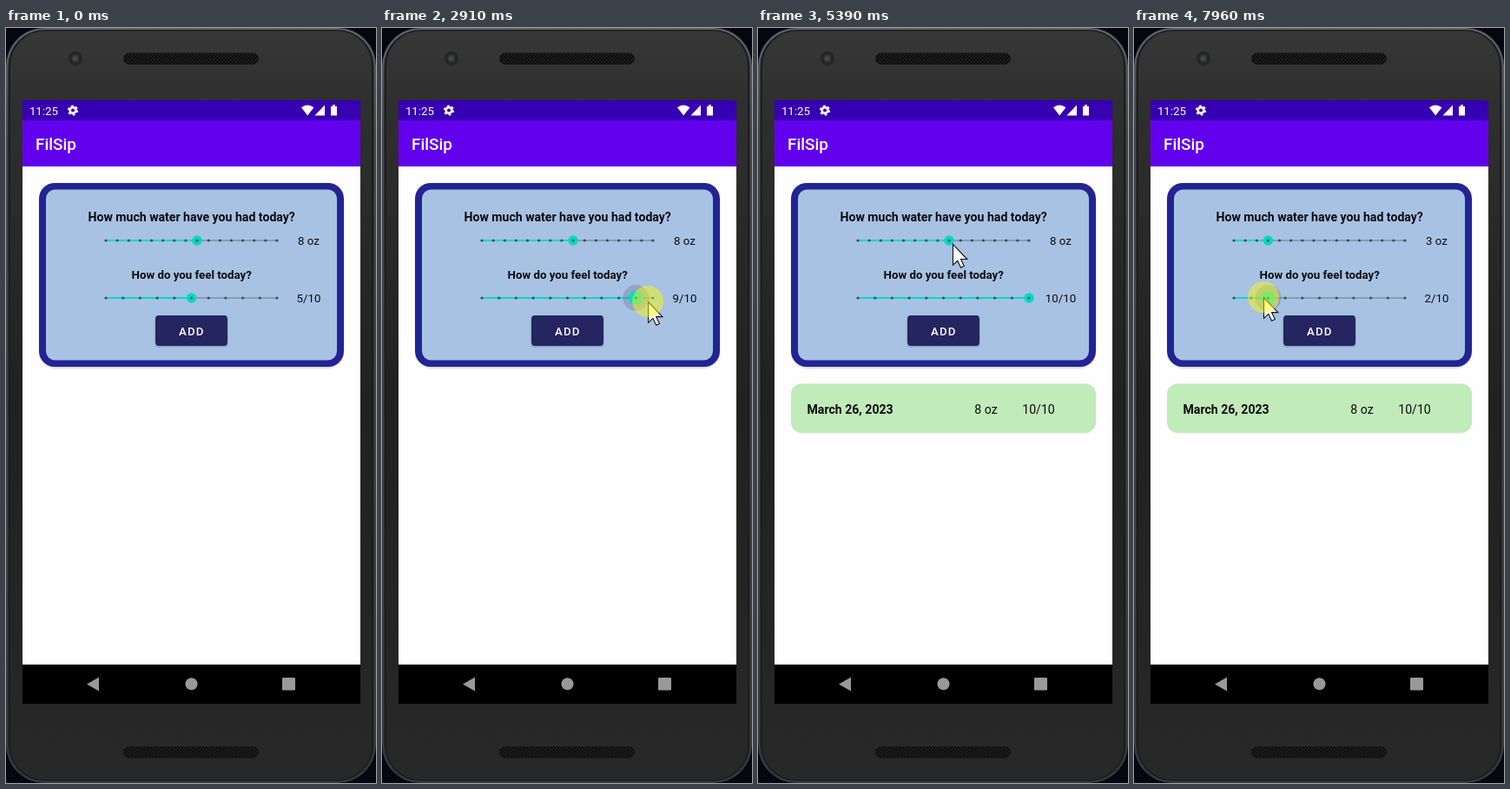
An HTML page that plays this animation: 426 px wide and 867 px high, repeating every 8000 ms.

```html
<!DOCTYPE html>
<html lang="en">
<head>
<meta charset="utf-8">
<title>Water log demo</title>
<style>
  html, body { margin: 0; width: 100%; height: 100%; overflow: hidden; background: #05060f; }
  svg { display: block; width: 100%; height: 100%; }
  text { font: 14.1px Roboto, sans-serif; fill: #0b0b0d; }
  .mid { text-anchor: middle; }
  .bold { font-weight: 700; }
  .small { font-size: 13.25px; }
  .bar { fill: #fff; font-size: 13.25px; }
  .title { fill: #fff; font-size: 18.9px; font-weight: 500; }
  .button { fill: #fff; font-size: 13.25px; font-weight: 500; letter-spacing: 1.18px; }
</style>
</head>
<body>
<svg viewBox="0 0 426 867">
  <defs>
    <linearGradient id="body" x2="0" y2="1">
      <stop offset="0" stop-color="#363736"/>
      <stop offset=".1" stop-color="#2e2f2e"/>
      <stop offset=".5" stop-color="#202120"/>
      <stop offset="1" stop-color="#272827"/>
    </linearGradient>
    <linearGradient id="rim" x2="0" y2="1">
      <stop offset="0" stop-color="#606166"/>
      <stop offset=".15" stop-color="#45464a"/>
      <stop offset="1" stop-color="#38393c"/>
    </linearGradient>
    <pattern id="mesh" width="4" height="4" patternUnits="userSpaceOnUse">
      <rect width="4" height="4" fill="#1c1c1c"/>
      <circle cx="1" cy="1" r=".9" fill="#060606"/>
      <circle cx="3" cy="3" r=".9" fill="#060606"/>
    </pattern>
    <clipPath id="buttonClip"><rect x="172" y="330" width="83" height="35" rx="4"/></clipPath>
    <filter id="soft" x="-10%" y="-20%" width="120%" height="150%"><feGaussianBlur stdDeviation="1.3"/></filter>
  </defs>

  <!-- Phone -->
  <rect width="426" height="867" fill="#05060f"/>
  <rect width="426" height="867" rx="44" fill="url(#rim)"/>
  <rect x="2.5" y="2" width="421" height="863" rx="42" fill="#1d1e1f"/>
  <rect x="5" y="3.5" width="416" height="860" rx="40" fill="url(#body)"/>
  <circle cx="80" cy="35" r="8" fill="#242525"/>
  <circle cx="80" cy="35" r="4.5" fill="#353940"/>
  <circle cx="79.5" cy="35" r="2" fill="#4a4f57"/>
  <g fill="url(#mesh)" stroke="#161616">
    <rect x="135.5" y="29" width="155" height="12.5" rx="6.2"/>
    <rect x="135.5" y="825.5" width="155" height="12.5" rx="6.2"/>
  </g>

  <!-- Screen -->
  <rect x="19" y="83" width="389" height="693" fill="#fefefe"/>
  <rect x="19" y="83" width="389" height="24" fill="#3700b3"/>
  <rect x="19" y="106" width="389" height="53" fill="#6200ee"/>
  <rect x="19" y="731" width="389" height="45"/>
  <text class="bar" x="26.9" y="99.5">11:25</text>
  <circle cx="77" cy="94.5" r="3.4" fill="none" stroke="#fff" stroke-width="2.6"/>
  <circle cx="77" cy="94.5" r="5.2" fill="none" stroke="#fff" stroke-width="1.8" stroke-dasharray="2.7 2.745"/>
  <path fill="#fff" d="M340 91.3Q347 85.5 354.5 91.3L347.2 100.5ZM367 88.5V100.5H355.5ZM374 90H376V88.3H379V90H381V100.5H374Z"/>
  <text class="title" x="34" y="139.5">FilSip</text>
  <g fill="#999">
    <path d="M93 753.5L107 745.5V761.5Z"/>
    <circle cx="213.5" cy="753.3" r="7"/>
    <rect x="318" y="746" width="15" height="14.5" rx="1.2"/>
  </g>

  <!-- Entry form -->
  <rect x="39" y="180" width="349" height="210.5" rx="18" fill="#777" opacity=".4" filter="url(#soft)"/>
  <rect x="38" y="178" width="351" height="211" rx="18" fill="#222493"/>
  <rect x="46" y="185.5" width="335" height="196" rx="10.5" fill="#a8c2e3"/>
  <text class="mid bold" x="213.7" y="221.5">How much water have you had today?</text>
  <text class="mid bold small" x="213.7" y="287.7">How do you feel today?</text>
  <g id="water"></g>
  <g id="feel"></g>
  <rect x="172" y="332" width="83" height="34" rx="4" fill="#334" opacity=".35" filter="url(#soft)"/>
  <rect x="172" y="330" width="83" height="35" rx="4" fill="#242561"/>
  <circle id="ripple" cx="230" cy="339" fill="#fff" clip-path="url(#buttonClip)"/>
  <text class="button" x="199" y="353">ADD</text>

  <!-- Saved entry -->
  <g id="entry">
    <rect x="39" y="411" width="349" height="54" rx="12" fill="#999" opacity=".4" filter="url(#soft)"/>
    <rect x="38" y="408.5" width="351" height="56" rx="12" fill="#c1ebb9"/>
    <text class="bold" x="56.5" y="442.5">March 26, 2023</text>
    <text class="mid" x="262.5" y="442.5">8 oz</text>
    <text class="mid" x="323" y="442.5">10/10</text>
  </g>

  <g id="pointer">
    <path d="M.5.5V24.3L5.8 19.3L9.6 27.3L13.3 25.6L9.6 17.6H16.8Z" fill="#fff" stroke="#111" stroke-width="1.1"/>
    <circle id="press" r="18" fill="#fafa08" opacity=".48"/>
  </g>
</svg>
<script>
const LOOP = 8000, LAG = 70, LEFT = 115, WIDTH = 197;
const $ = id => document.getElementById(id);
const clamp = v => Math.max(0, Math.min(1, v));
const progress = (t, from, to) => clamp((t - from) / (to - from));

// Pointer stops: time, x, y, and 1 where the move to the stop is eased.
const stops = [
  [540, 405, 862], [1310, 275, 454], [1660, 249, 372], [1940, 230, 322], [2140, 218, 312],
  [2280, 218, 309], [2910, 306, 314], [2980, 315, 314], [3120, 324, 314],
  [3320, 324, 314], [3870, 231, 338, 1], [4550, 231, 338], [5190, 224, 249, 1],
  [5390, 224, 248], [5460, 222, 243], [6080, 156, 246], [6150, 154, 246], [6290, 151, 246],
  [6550, 151, 246], [7260, 312, 307, 1], [7400, 312, 307], [7880, 158, 308], [7960, 149, 309]
];

function pointerAt(t) {
  const next = stops.findIndex(s => s[0] > t);
  if (next < 1) return next ? stops.at(-1).slice(1, 3) : stops[0].slice(1, 3);
  const [t0, x0, y0] = stops[next - 1], [t1, x1, y1, eased] = stops[next];
  let k = progress(t, t0, t1);
  if (eased) k *= k * (3 - 2 * k);
  return [x0 + (x1 - x0) * k, y0 + (y1 - y0) * k];
}

function makeSlider(id, y, steps, initial, unit, drags) {
  const xOf = value => LEFT + WIDTH * value / steps;
  const ticks = Array.from({ length: steps + 1 }, (_, i) =>
    `<circle cx="${xOf(i)}" cy="${y}" r="1.6" fill="#34505f"/>`).join('');
  $(id).innerHTML = `
    <path d="M${LEFT} ${y}h${WIDTH}" stroke="#8a9bb6" stroke-width="1.8"/>
    <path class="active" stroke="#03dac5" stroke-width="2"/>
    <circle class="halo" cy="${y}" r="15" fill="#504a78" opacity=".24"/>
    <circle class="thumb" cy="${y}" fill="#03dac5"/>
    ${ticks}
    <text class="mid small value" x="348.5" y="${y + 5}"></text>`;
  const [active, halo, thumb, label] = ['active', 'halo', 'thumb', 'value'].map(c => $(id).querySelector('.' + c));

  return t => {
    const drag = drags.findLast(([start]) => start <= t);
    const pressed = drag && t < drag[1];
    const pointerX = drag && pointerAt(Math.min(t, drag[1]) - LAG)[0];
    const value = drag ? Math.round(clamp((pointerX - LEFT) / WIDTH) * steps) : initial;
    const x = xOf(value);
    active.setAttribute('d', `M${LEFT} ${y}H${x}`);
    thumb.setAttribute('cx', x);
    thumb.setAttribute('r', pressed ? 8 : 5.8);
    halo.setAttribute('cx', x);
    halo.style.display = pressed ? '' : 'none';
    label.textContent = value + unit;
  };
}

const waterDrags = [[5460, 6550]];
const feelDrags = [[2280, 3320], [7330, LOOP]];
const presses = [...waterDrags, ...feelDrags, [4070, 4140]];
const drawWater = makeSlider('water', 244, 15, 8, ' oz', waterDrags);
const drawFeel = makeSlider('feel', 310, 10, 5, '/10', feelDrags);

function draw(t) {
  drawWater(t);
  drawFeel(t);
  $('ripple').setAttribute('r', 6 + 64 * progress(t, 4130, 4400));
  $('ripple').setAttribute('opacity', .1 * progress(t, 4100, 4200) * (1 - progress(t, 4350, 4910)));
  $('entry').setAttribute('opacity', progress(t, 4280, 4420));
  $('pointer').style.display = t < 540 ? 'none' : '';
  $('pointer').setAttribute('transform', `translate(${pointerAt(t)})`);
  $('press').style.display = presses.some(([from, to]) => t >= from && t < to) ? '' : 'none';
}

const begin = performance.now();
function tick() {
  draw((performance.now() - begin) % LOOP);
  requestAnimationFrame(tick);
}
tick();
</script>
</body>
</html>
```
